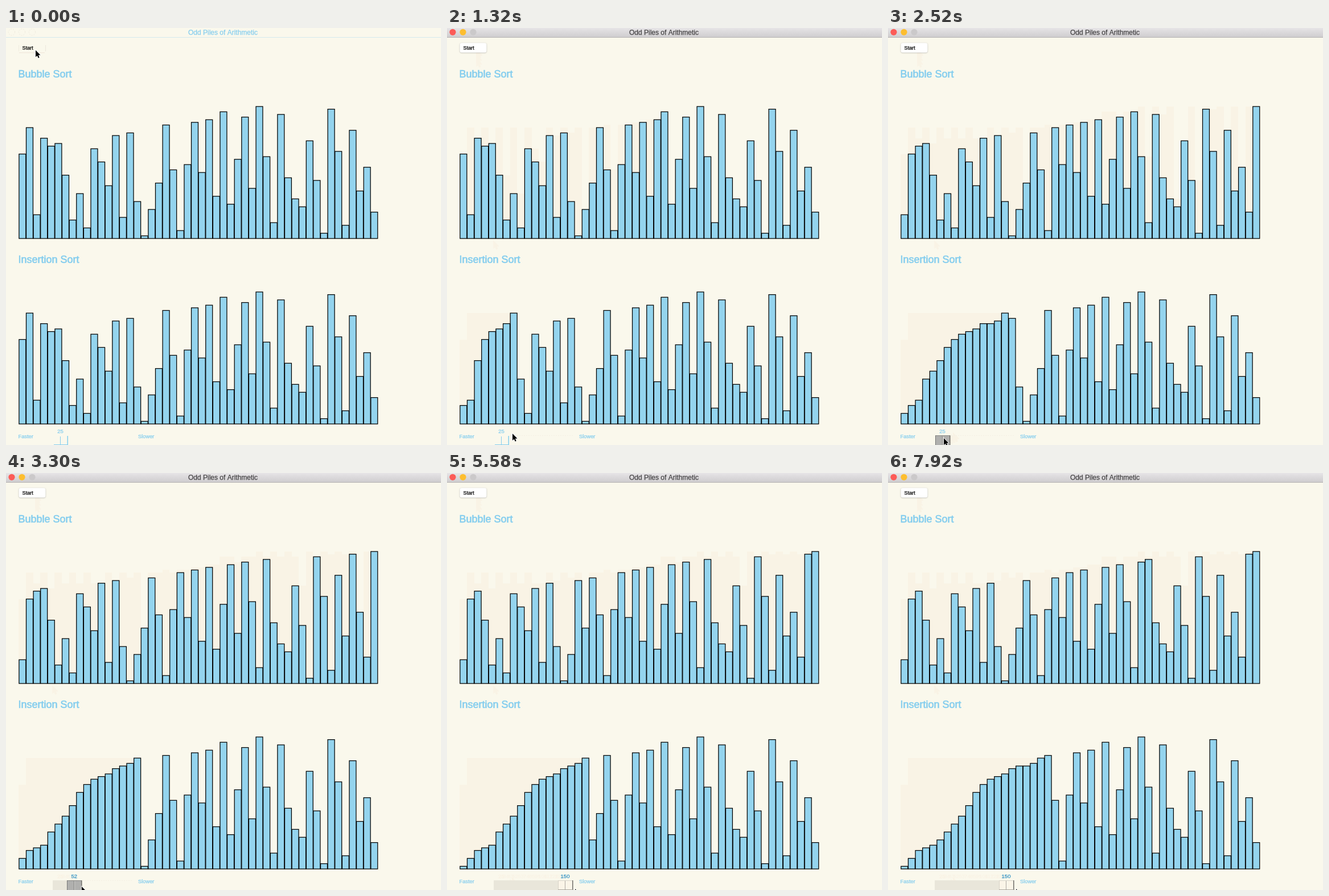
Recreate the animation shown at these times as an HTML page with a canvas. Size 764 px wide and 733 px high, loop 8000 ms.

```html
<!DOCTYPE html>
<html lang="en">
<head>
<meta charset="utf-8">
<title>Sorting</title>
<style>
html, body { margin: 0; width: 100%; height: 100%; overflow: hidden; background: #faf8ec; }
canvas { display: block; }
</style>
</head>
<body>
<canvas id="stage" width="764" height="733"></canvas>
<script>
const ctx = document.getElementById('stage').getContext('2d');
const LOOP = 8000, TICK = 60, ACTIVE_AT = 540;
const CREAM = '#faf8ec', BLUE = '#94d4ee', TEXT_BLUE = '#84cdee', TRACE = '#f9f3e5';
const BAR = { left: 22.9, pitch: 12.61, width: 11.95, unit: 4.64 };

const values = [
  32, 42, 9, 38, 35, 36, 24, 7, 17, 4, 34, 29, 20, 39, 8, 40, 14, 1, 11, 21, 43, 26, 3, 28, 44,
  25, 45, 16, 48, 13, 30, 46, 19, 50, 31, 6, 47, 23, 15, 12, 37, 22, 2, 49, 33, 5, 41, 18, 27, 10
];

// Rows are [time, value, ...]
const stepTrack = [
  [563, 0], [3140, 92.37], [3300, 95.4], [3400, 97.2], [3520, 98.9],
  [3650, 100.3], [3790, 101.3], [3930, 102], [8130, 132]
];
const delayTrack = [[3120, 25], [3300, 52], [3840, 150]];
const cursorTrack = [
  [660, 52, 39], [720, 52, 48], [780, 52, 55], [840, 82, 375], [900, 115, 713],
  [2220, 115, 713], [2460, 98, 721], [3060, 98, 721], [3300, 133, 727], [3840, 225, 731]
];

function sample(track, t, column = 1) {
  if (t <= track[0][0]) return track[0][column];
  const next = track.findIndex(row => row[0] > t);
  if (next < 0) return track[track.length - 1][column];
  const a = track[next - 1], b = track[next];
  return a[column] + (b[column] - a[column]) * (t - a[0]) / (b[0] - a[0]);
}

// Each comparison is one step
function* bubbleSort(list) {
  for (let end = list.length - 1; end > 0; end--) {
    for (let j = 0; j < end; j++) {
      if (list[j] > list[j + 1]) [list[j], list[j + 1]] = [list[j + 1], list[j]];
      yield;
    }
  }
}

// Each shift and each final placement is one step
function* insertionSort(list) {
  for (let i = 1; i < list.length; i++) {
    const key = list[i];
    let j = i;
    for (; j > 0 && list[j - 1] > key; j--) {
      list[j] = list[j - 1];
      yield;
    }
    list[j] = key;
    yield;
  }
}

function recorder(sort) {
  const list = values.slice(), run = sort(list);
  let done = 0, peaks = list.slice();
  return target => {
    for (; done < target; done++) run.next();
    peaks = peaks.map((peak, i) => Math.max(peak, list[i]));
    return { list: list.slice(), peaks };
  };
}

const recordBubble = recorder(bubbleSort), recordInsertion = recorder(insertionSort);
const ticks = Array.from({ length: Math.floor(LOOP / TICK) }, (_, k) => {
  const t = k * TICK, steps = Math.floor(sample(stepTrack, t) + 1e-6);
  return {
    t,
    bubble: recordBubble(steps),
    insertion: recordInsertion(steps - 1),
    delay: Math.round(sample(delayTrack, t)),
    cursor: [sample(cursorTrack, t, 1), sample(cursorTrack, t, 2)]
  };
});

function rect(x, y, w, h, color) {
  ctx.fillStyle = color;
  ctx.fillRect(x, y, w, h);
}

// A thin stroke gives the text a slightly heavier weight
function label(text, x, y, size, color, align = 'left', weight = 0.25) {
  ctx.font = `${size}px "Liberation Sans", Arial, sans-serif`;
  ctx.textAlign = align;
  ctx.fillStyle = ctx.strokeStyle = color;
  ctx.lineWidth = weight;
  ctx.fillText(text, x, y);
  ctx.strokeText(text, x, y);
}

function drawBars({ list, peaks }, base) {
  const x = i => BAR.left + i * BAR.pitch;
  peaks.forEach((v, i) => {
    const left = Math.round(x(i) - 0.5), right = Math.round(x(i + 1) - 0.5);
    const top = Math.round(base - v * BAR.unit);
    rect(left, top, right - left, base - top, TRACE);
  });
  ctx.strokeStyle = '#000';
  ctx.lineWidth = 1.25;
  list.forEach((v, i) => {
    const box = [x(i), base - v * BAR.unit, BAR.width, v * BAR.unit];
    rect(...box, BLUE);
    ctx.strokeRect(...box);
  });
}

function drawCursor([x, y], fill, edge) {
  const outline = [[0, 0], [0, 12], [2.8, 9.5], [4.7, 13.8], [6.7, 13], [4.8, 8.8], [8.5, 8.5]];
  ctx.beginPath();
  outline.forEach(([dx, dy]) => ctx.lineTo(x + dx, y + dy));
  ctx.closePath();
  ctx.strokeStyle = edge;
  ctx.lineWidth = 1.4;
  ctx.stroke();
  ctx.fillStyle = fill;
  ctx.fill();
}

function circlePath(i) {
  ctx.beginPath();
  ctx.arc(10 + 18 * i, 7.3, 5.6, 0, 7);
}

function drawWindow(active) {
  if (active) {
    const shade = ctx.createLinearGradient(0, 0, 0, 16);
    shade.addColorStop(0, '#e6e4e6');
    shade.addColorStop(1, '#cfcdcf');
    rect(0, 0, 764, 16, shade);
    rect(0, 16, 764, 1, '#b4b2b2');
    ['#fc5b57', '#fdbe2f', '#cbc9ca'].forEach((color, i) => {
      circlePath(i);
      ctx.fillStyle = color;
      ctx.fill();
    });
    ctx.save();
    ctx.shadowColor = 'rgba(0, 0, 0, 0.3)';
    ctx.shadowBlur = 2;
    ctx.shadowOffsetY = 0.5;
    ctx.beginPath();
    ctx.roundRect(22.5, 26.3, 47, 17, 3.5);
    ctx.fillStyle = '#fff';
    ctx.fill();
    ctx.restore();
  } else {
    rect(0, 16, 764, 1, '#d5e9ee');
    ctx.strokeStyle = '#eeeade';
    ctx.lineWidth = 1;
    ctx.setLineDash([2, 2]);
    for (let i = 0; i < 3; i++) {
      circlePath(i);
      ctx.stroke();
    }
    ctx.setLineDash([]);
    rect(23, 43, 45, 1, '#efe4d8');
    rect(69, 30, 1, 11, '#ebe7dc');
    rect(22, 30, 1, 11, '#f0ecdf');
  }
  label('Odd Piles of Arithmetic', 381, 11.7, 12, active ? '#454345' : TEXT_BLUE, 'center');
  label('Start', 28.5, 38.2, 9.2, '#000');
}

const thumbCenter = delay => 96 + (delay - 25) * 0.896;

function drawReading(delay, color) {
  label(delay, thumbCenter(delay) - 0.5, 712.4, 9.5, color, 'center');
}

function drawSlider(t, delay) {
  const x = Math.round(thumbCenter(delay)) - 13;
  label('Faster', 21.5, 721.2, 9.3, TEXT_BLUE);
  label('Slower', 232, 721.2, 9.3, TEXT_BLUE);
  drawReading(delay, delay > 25 ? '#2b8fc2' : TEXT_BLUE);
  if (t >= ACTIVE_AT && delay < 150) {
    for (let dot = x + 28; dot < 222; dot += 4) rect(dot, 716, 2, 1, '#f4efe3');
  }
  if (t < 2400) {
    rect(84, 732, 25, 1, TEXT_BLUE);
    rect(95, 718, 1, 14, TEXT_BLUE);
    rect(107.5, 717, 1.5, 16, TEXT_BLUE);
    return;
  }
  if (delay > 25) rect(82, 716, x - 82, 17, '#e9e6da');
  const pressed = t < 3840;
  rect(x, 716, 26, 17, pressed ? '#b0b0ae' : '#fbf5e8');
  rect(x, 716, 26, 1, pressed ? '#858583' : '#d8d4c9');
  rect(x, 716, 1, 17, pressed ? '#777' : '#d8d4c9');
  rect(x + 12, 717, 1, 16, pressed ? '#858583' : '#aaa69d');
  rect(x + 13, 717, 1, 16, pressed ? '#d0d0cd' : '#fffaf0');
  rect(x + 25, 716, 1.5, 17, '#6f6d69');
  if (!pressed) rect(x, 732, 26, 1, '#aaa69d');
}

function draw(k) {
  const { t, bubble, insertion, delay, cursor } = ticks[k];
  rect(0, 0, 764, 733, CREAM);
  // Faint traces of earlier cursor places and readings
  for (const past of ticks.slice(0, k)) {
    if (past.cursor[0] !== cursor[0]) drawCursor(past.cursor, TRACE, TRACE);
    if (past.delay !== delay) drawReading(past.delay, TRACE);
  }
  drawWindow(t >= ACTIVE_AT);
  label('Bubble Sort', 21.5, 87.3, 18, TEXT_BLUE, 'left', 0.6);
  label('Insertion Sort', 21.5, 413.3, 18, TEXT_BLUE, 'left', 0.6);
  drawBars(bubble, 370);
  drawBars(insertion, 696);
  drawSlider(t, delay);
  drawCursor(cursor, '#000', '#fff');
}

const start = performance.now();
function play() {
  const t = (performance.now() - start) % LOOP;
  draw(Math.min(ticks.length - 1, Math.floor(t / TICK)));
  requestAnimationFrame(play);
}
play();
</script>
</body>
</html>
```
